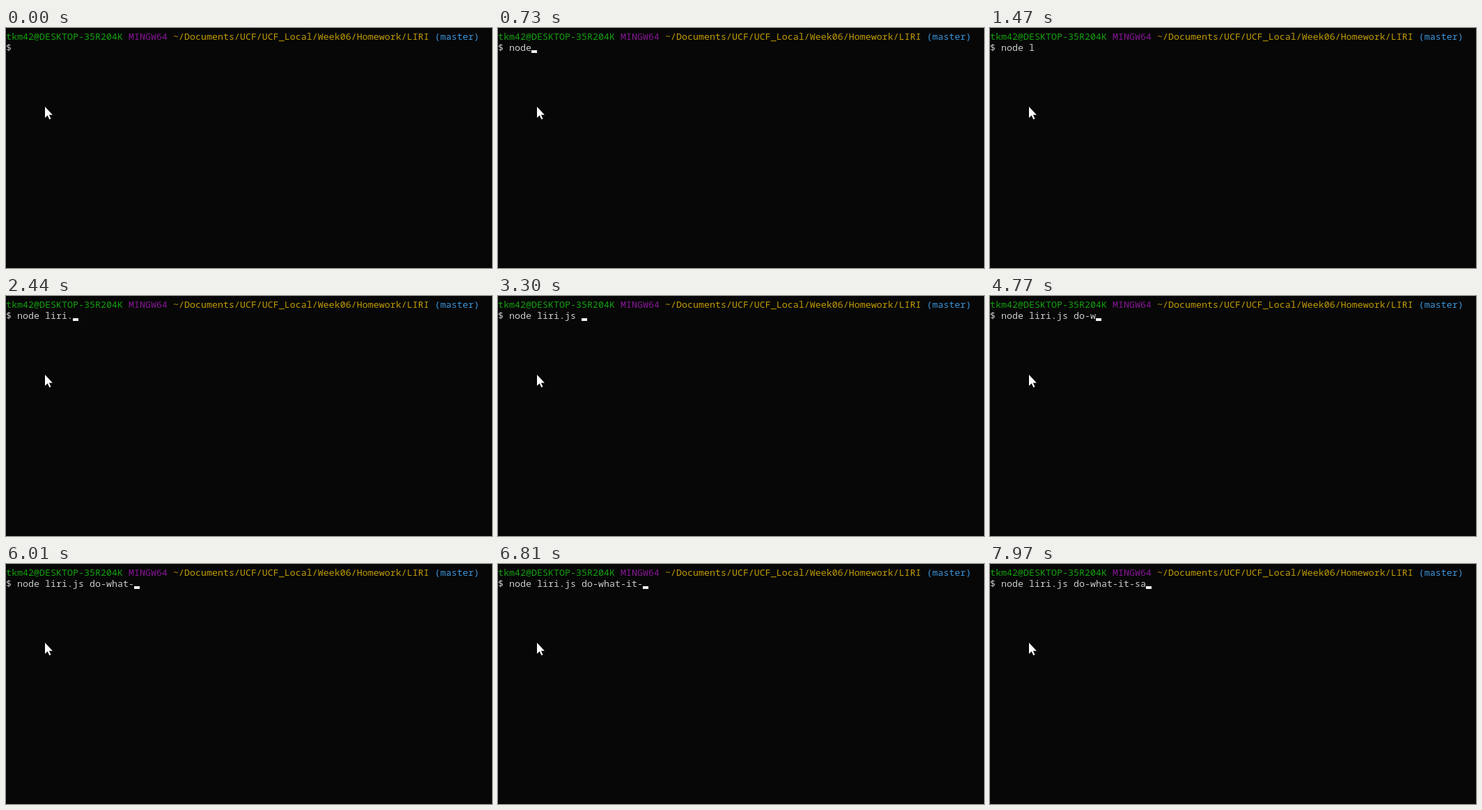
These frames come from a looping animation (698 by 346 pixels, 8 s). An HTML page:

```html
<!DOCTYPE html>
<html lang="en">
<head>
<meta charset="utf-8">
<title>Terminal</title>
<style>
  html, body { margin: 0; width: 100%; height: 100%; overflow: hidden; background: #070707; }
  svg { display: block; width: 100vw; height: 100vh; }
  text { font: 13.333px "Noto Sans Mono", "DejaVu Sans Mono", monospace; white-space: pre; }
</style>
</head>
<body>
<svg viewBox="0 0 698 346">
  <text y="17" id="prompt"></text>
  <text y="33" id="line" fill="#ccc"></text>
  <rect id="caret" y="32" width="8" height="4" fill="#f2f2f2"/>
  <path d="M56 113.5v16l3.7-3.5 2.6 5.7 2.2-1-2.6-5.4h5z" fill="#fff"/>
</svg>
<script>
const LOOP = 8000, CELL = 8, BLINK = 530;
const $ = id => document.getElementById(id);

const prompt = {
  'tkm42@DESKTOP-35R204K ': '#13a10e',
  'MINGW64 ': '#881798',
  '~/Documents/UCF/UCF_Local/Week06/Homework/LIRI ': '#c19c00',
  '(master)': '#3a96dd'
};
for (const [str, fill] of Object.entries(prompt)) {
  const span = document.createElementNS('http://www.w3.org/2000/svg', 'tspan');
  span.setAttribute('fill', fill);
  span.textContent = str;
  $('prompt').append(span);
}

// Bursts of even typing: text, time of its first and last key
const bursts = [
  ['node l', 300, 930],
  ['iri.js ', 1650, 2960],
  ['do-w', 3600, 4500],
  ['hat-it-', 4950, 6600],
  ['sa', 7200, 7600]
];
const keys = bursts.flatMap(([str, from, to]) =>
  [...str].map((char, i) => ({ char, time: from + (to - from) * i / (str.length - 1) })));

function draw(t) {
  const typed = keys.filter(k => k.time <= t);
  const last = typed.length ? typed.at(-1).time : -BLINK;
  $('line').textContent = '$ ' + typed.map(k => k.char).join('');
  $('caret').setAttribute('x', (typed.length + 2) * CELL);
  // Each key press restarts the blink with the caret lit
  $('caret').style.opacity = Math.floor((t - last) / BLINK) % 2 ? 0 : 1;
}

const start = performance.now();
function tick() {
  draw((performance.now() - start) % LOOP);
  requestAnimationFrame(tick);
}
tick();
</script>
</body>
</html>
```
